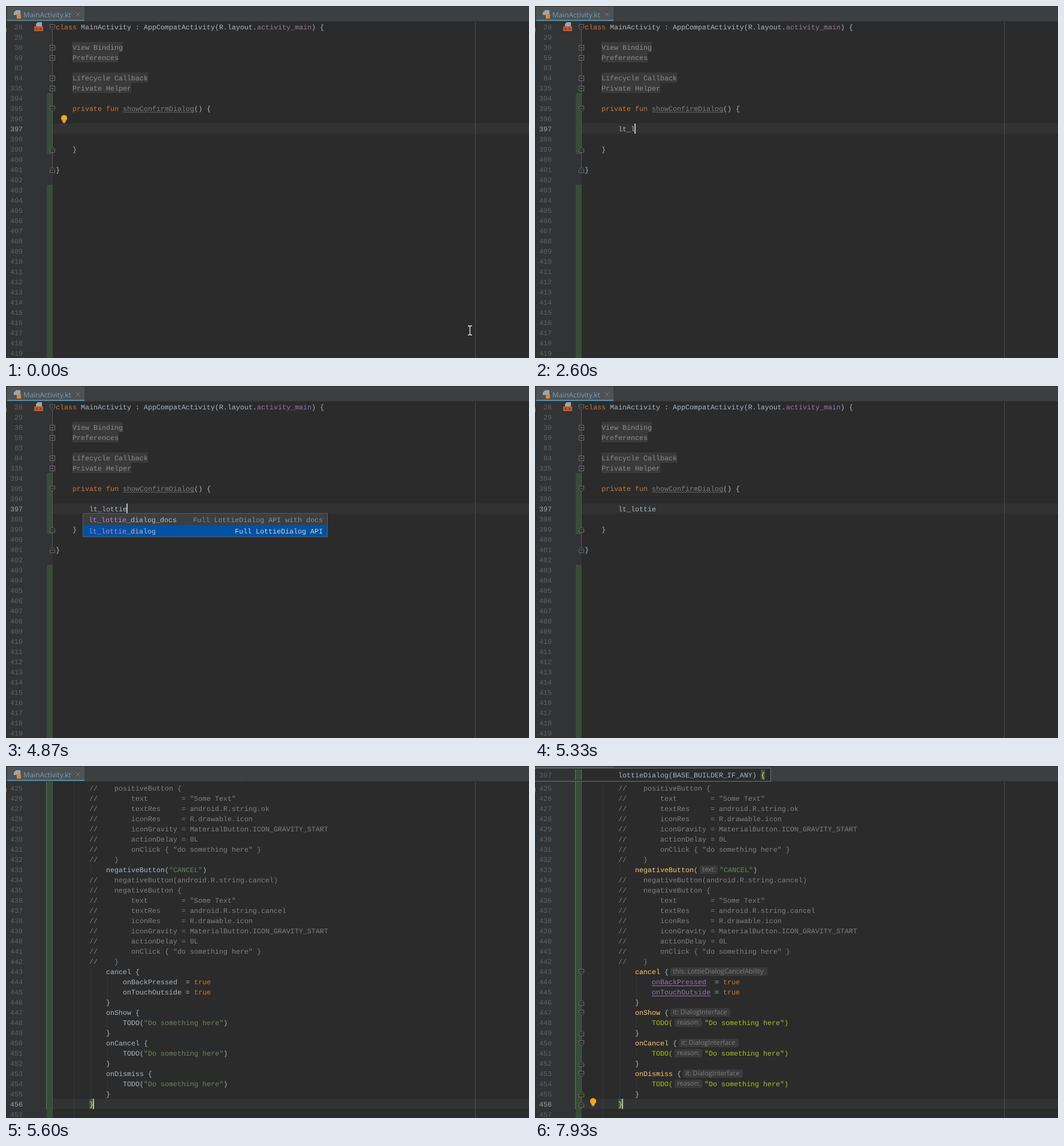
Animation, 873 px wide and 587 px high, one loop 8 s. Source, as an HTML page:

```html
<!DOCTYPE html>
<html lang="en">
<head>
<meta charset="utf-8">
<title>Live template</title>
<style>
html, body { margin: 0; width: 100%; height: 100%; overflow: hidden; background: #2b2b2b; }
svg { display: block; width: 873px; height: 587px; }
text { white-space: pre; text-rendering: geometricPrecision; font: 11.666px "Liberation Mono", "DejaVu Sans Mono", monospace; }
.ui { font: 11px "Open Sans", "Noto Sans", sans-serif; }
.tab { font-size: 11.8px; }
</style>
</head>
<body>
<svg id="stage" viewBox="0 0 873 587"></svg>
<script>
const LOOP = 8000, CW = 7, LH = 17, LEFT = 83;
const C = {
  text: '#a9b7c6', key: '#cc7832', note: '#808080', str: '#6a8759', prop: '#9876aa',
  fn: '#ffc66d', todo: '#a8c023', num: '#606366', cur: '#a4a3a3', add: '#384c38',
  gutter: '#313335', bg: '#2b2b2b', line: '#323232', fold: '#6c6e70', brace: '#ffef28'
};

const esc = s => s.replace(/&/g, '&amp;').replace(/</g, '&lt;');
const rect = (x, y, w, h, fill, extra = '') =>
  `<rect x="${x}" y="${y}" width="${w}" height="${h}" fill="${fill}" ${extra}/>`;
const path = (d, stroke, extra = '') => `<path d="${d}" stroke="${stroke}" fill="none" ${extra}/>`;
const text = (x, y, s, fill, extra = '') => `<text x="${x}" y="${y}" fill="${fill}" ${extra}>${esc(s)}</text>`;
const group = (id, body, extra = '') => `<g id="${id}" ${extra}>${body}</g>`;
const colX = c => LEFT + CW * c;
const rowY = n => 154 + LH * (n - 394);
const italic = 'font-style="italic"';

// Runs are [string, colour, attributes] laid out from one column.
function runs(col, y, list, shift = 0) {
  return list.map(([s, fill = C.text, extra = '']) => {
    const out = text(colX(col) + shift, y + 4, s, fill, extra);
    col += s.length;
    return out;
  }).join('');
}

function codeLine(src, y) {
  const col = src.search(/\S/);
  const body = src.trim();
  if (col < 0) return '';
  if (body.startsWith('//')) return runs(col, y, [[body, C.note]]);
  return runs(col, y, body.split(/("[^"]*"|\btrue\b)/).filter(Boolean).map(s =>
    [s, s[0] === '"' ? C.str : s === 'true' ? C.key : C.text]));
}

const lineNo = (n, y, fill = C.num) => text(28, y + 4, String(n), fill, 'text-anchor="end"');

function foldPlus(y) {
  return rect(73.5, y - 4, 8, 8, C.bg, `stroke="${C.fold}"`) +
    path(`M75.5 ${y}h4M77.5 ${y - 2}v4`, C.fold);
}
function foldMark(y, dir) {
  return `<path d="M73.5 ${y - 4.5 * dir}h8v${5 * dir}l-4 ${4 * dir}l-4 ${-4 * dir}z" fill="${C.bg}" stroke="${C.fold}"/>` +
    path(`M75.5 ${y - dir * .5}h4`, C.fold);
}
const foldOpen = y => foldMark(y, 1);
const foldEnd = y => foldMark(y, -1);

const bulb = y => `<circle cx="97" cy="${y - 1}" r="5.2" fill="#f4a41f"/>` +
  rect(94.5, y + 3, 5, 2, '#f4a41f') + rect(94.5, y + 5, 5, 1, '#c8c8c8') + rect(95.5, y + 7, 3, 1, '#a0a0a0');

function hint(x, y, s, w) {
  return rect(x, y - 7, w, 14, '#3a3a3a', 'rx="3"') + text(x + 4, y + 3, s, '#7d7d7d', 'class="ui"');
}

function background() {
  return rect(0, 0, 873, 587, C.bg) + rect(0, 26, 78, 561, C.gutter) + rect(0, 26, 1, 561, C.bg) +
    rect(0, 36, 1, 8, '#8a6a3c') + rect(0, 107, 1, 18, '#0d3a58');
}

function tabBar() {
  return rect(0, 0, 873, 26, '#3c3f41') + rect(0, 0, 873, 1, '#323232') + rect(0, 25, 873, 1, '#323232') +
    rect(2, 1, 129, 22, '#4e5254') + '<rect id="underline" x="2" y="23" width="129" height="2"/>' +
    `<path d="M17 7h7v8h-11v-4z" fill="#9aa7b0"/>` + rect(18, 14, 7, 7, '#e0843a') +
    text(29, 19, 'MainActivity.kt', '#6fa0c4', 'class="ui tab"') +
    path('M116.500 10.500l7 7m0-7l-7 7', '#75797c');
}

function beforeDoc() {
  const head = [28, 29, 30, 59, 83, 84, 335];
  let s = rect(68, 145, 10, 102, C.add) + rect(68, 298, 10, 289, C.add) +
    rect(78, 196, 795, LH, C.line) + path('M77.500 40V273', '#555759');
  for (let i = 0; i < 33; i++) {
    const n = i < 7 ? head[i] : 387 + i;
    s += lineNo(n, 35 + LH * i, n === 397 ? C.cur : C.num);
  }
  s += runs(0, 35, [['class ', C.key], ['MainActivity : AppCompatActivity(R.layout.'],
    ['activity_main', C.prop, italic], [') {']]);
  [['View Binding', 69], ['Preferences', 86], ['Lifecycle Callback', 120], ['Private Helper', 137]].forEach(([name, y]) => {
    s += rect(111, y - 9, name.length * CW, LH, '#3a3a3a') + runs(4, y, [[name, '#8a8d88']]) + foldPlus(y + .5);
  });
  s += runs(4, 171, [['private fun ', C.key], ['showConfirmDialog', '#7b7d80'], ['() {']]);
  let wave = 'M195 178';
  for (let x = 0; x < 119; x += 4) wave += 'l2-2l2 2';
  s += path(wave, '#747678', 'stroke-width=".8"');
  s += runs(4, 239, [['}']]) + runs(0, 273, [['}']]);
  s += foldOpen(35.5) + foldOpen(171.5) + foldEnd(239.5) + foldEnd(273.5);
  // layout file icon
  s += '<path d="M53 27h7v7h-10v-4z" fill="#9aa7b0"/>' + rect(47, 34, 15, 8, '#c4562c') +
    path('M52.500 36l-2 2l2 2M56.500 36l2 2l-2 2', '#3a2018');
  return s;
}

const note = s => ' '.repeat(8) + '//' + ' '.repeat(4) + s;
const field = (k, v, w) => note('    ' + k.padEnd(w) + '= ' + v);
const call = s => ' '.repeat(12) + s;

function textBlock(name, label) {
  return [call(`${name}("${label}")`), note(`${name}(R.string.text)`), note(`${name} {`),
    field('text', `"${label}"`, 9), field('textRes', 'R.string.text', 9),
    field('fontRes', 'R.font.font', 9), field('styleRes', 'R.style.TextAppearance', 9), note('}')];
}
function buttonBlock(kind, label) {
  const name = kind + 'Button', res = 'android.R.string.' + label.toLowerCase();
  return [call(`${name}("${label}")`), note(`${name}(${res})`), note(`${name} {`),
    field('text', '"Some Text"', 12), field('textRes', res, 12), field('iconRes', 'R.drawable.icon', 12),
    field('iconGravity', 'MaterialButton.ICON_GRAVITY_START', 12), field('actionDelay', '0L', 12),
    note('    onClick { "do something here" }'), note('}')];
}
const events = ['onShow', 'onCancel', 'onDismiss'];
const FIRST = 403;
const template = [
  field('animRes', 'R.raw.animation', 9), field('height', '200', 9), field('loop', 'true', 9), note('}'),
  ...textBlock('title', 'Some Title'), ...textBlock('content', 'Some Content'),
  ...buttonBlock('positive', 'OK'), ...buttonBlock('negative', 'CANCEL'),
  call('cancel {'), call('    onBackPressed  = true'), call('    onTouchOutside = true'), call('}'),
  ...events.flatMap(e => [call(e + ' {'), call('    TODO("Do something here")'), call('}')])
];
const analysed = n => n === 433 || n >= 443;

// Rows as they look after code analysis, with or without inlay hints.
function semantic(hints) {
  const fn = s => [s, C.fn, italic];
  const todo = s => [s, C.todo, italic];
  let y = rowY(433);
  let s = runs(12, y, [fn('negativeButton'), ['(']]) +
    runs(27, y, [['"CANCEL"', C.str], [')']], hints ? 36 : 0);
  if (hints) s += hint(275, y, 'text:', 30);
  y = rowY(443);
  s += runs(12, y, [fn('cancel'), [' {']]);
  if (hints) s += hint(226, y, 'this: LottieDialogCancelAbility', 162);
  ['onBackPressed', 'onTouchOutside'].forEach((name, i) => {
    const ry = rowY(444 + i);
    s += runs(16, ry, [[name, C.prop]]) + runs(31, ry, [['= '], ['true', C.key]]) +
      rect(195, ry + 6, name.length * CW, 1, C.prop);
  });
  s += runs(12, rowY(446), [['}']]);
  events.forEach((name, i) => {
    const n = 447 + 3 * i;
    s += runs(12, rowY(n), [fn(name), [' {']]) + runs(16, rowY(n + 1), [todo('TODO(')]) +
      runs(21, rowY(n + 1), [todo('"Do something here")')], hints ? 53 : 0) + runs(12, rowY(n + 2), [['}']]);
    if (hints) s += hint(colX(14 + name.length) + 3, rowY(n), 'it: DialogInterface', 100) +
      hint(233, rowY(n + 1), 'reason:', 46);
  });
  return s;
}

function afterDoc() {
  const top = rowY(397) - 9, end = rowY(456) + 8;
  const guide = (col, a, b) => rect(colX(col) + 2, rowY(a) - 9, 1, (b - a + 1) * LH, '#373737');
  let s = rect(68, top, 10, 1200, C.add) + rect(67, top, 1, end - top, '#548050') +
    rect(77, top, 1, end - top, '#446344') + rect(78, rowY(456) - 9, 795, LH, C.line) + guide(4, 397, 458);
  [[407, 407], [415, 415], [423, 423], [433, 433], [443, 455]].forEach(([a, b]) => s += guide(8, a, b));
  [[444, 445], [448, 448], [451, 451], [454, 454]].forEach(([a, b]) => s += guide(12, a, b));
  for (let n = FIRST; n < 460; n++) s += lineNo(n, rowY(n), n === 456 ? C.cur : C.num);
  let raw = '';
  template.forEach((src, i) => {
    const n = FIRST + i, line = codeLine(src, rowY(n));
    if (analysed(n)) raw += line; else s += line;
  });
  const last = rowY(456);
  s += rect(139, last - 9, CW, LH, '#3b514d') + runs(8, last, [['}', C.brace, 'font-weight="bold"']]);
  const folds = [443, 447, 450, 453].map(n => foldOpen(rowY(n) + .5)).join('') +
    [446, 449, 452, 455, 456].map(n => foldEnd(rowY(n) + .5)).join('');
  return s + group('raw', raw) + group('sem', semantic(false)) + group('hints', semantic(true)) +
    group('folds', folds) + group('bulbB', bulb(last - 4)) + group('caretB', rect(145, last - 9, 2, LH, '#bbbbbb'));
}

function popup() {
  const item = (y, name, info) => text(138, y, 'lt_lottie', '#c77fd6') + text(201, y, name, '#bbbbbb') + info;
  const info = (y, s, id) => text(529, y, s, '#8c8c8c', `id="${id}" text-anchor="end"`);
  return rect(128.5, 212.5, 408, 39, '#3c3f41', 'stroke="#5a5d5f"') +
    rect(129, 232, 407, 19, '#0052a4', 'id="picked"') +
    item(227, '_dialog_docs', info(227, 'Full LottieDialog API with docs', 'info1')) +
    item(246, '_dialog', info(246, 'Full LottieDialog API', 'info2'));
}

function header() {
  return rect(0, 3, 394, 23, C.bg) + rect(0, 3, 78, 23, C.gutter) + rect(68, 6, 10, 17, C.add) +
    path('M67.500 6V23M77.500 6V23', '#548050') + path('M0 3.500H393.500V25.500H0', '#737373') +
    lineNo(397, 15) + rect(377, 6, CW, LH, '#3b514d') +
    runs(8, 15, [['lottieDialog(BASE_BUILDER_IF_ANY) '], ['{', C.brace, 'font-weight="bold"']]);
}

const stage = document.getElementById('stage');
stage.innerHTML = '<clipPath id="view"><rect y="26" width="873" height="561"/></clipPath>' + background() +
  group('before', beforeDoc() + group('bulbA', bulb(188)) + text(139, 209, '', C.text, 'id="typed"') +
    rect(0, 196, 2, LH, '#bbbbbb', 'id="caretA"')) +
  `<g clip-path="url(#view)">${group('after', afterDoc())}</g>` +
  rect(783, 26, 1, 561, '#4d4d4d') + tabBar() + group('popup', popup()) + group('header', header()) +
  group('mouse', path('M-3.500-7.500H-1L0-6.500L1-7.500H3.500M0-6.500V6.500M-3.500 7.500H-1L0 6.500L1 7.500H3.500', '#e8e8e8', 'stroke-width="1.300"'));

const el = {};
stage.querySelectorAll('[id]').forEach(e => el[e.id] = e);
const show = (id, on) => el[id].style.display = on ? '' : 'none';
const keys = [2070, 2130, 2400, 2600, 2800, 2930, 3070, 3200, 3270];

function mouseAt(t) {
  if (t >= 1070) return [201.5, 207];
  const p = Math.min(Math.floor((t + 4) * 15 / 1000), 12) / 12;
  const e = p * p * (3 - 2 * p);
  return [Math.round(774 - 583 * e) + .5, Math.round(541 - 333 * e)];
}

function render(t) {
  const inRange = (a, b = LOOP) => t >= a && t < b;
  const typed = keys.filter(k => t >= k).length;
  el.typed.textContent = 'lt_lottie'.slice(0, typed);
  el.caretA.setAttribute('x', 138 + CW * typed);
  el.underline.setAttribute('fill', t < 1070 ? '#4a8499' : '#4094b4');
  el.mouse.setAttribute('transform', `translate(${mouseAt(t)})`);
  const scroll = t < 5530 ? 300 : t < 5600 ? 539 : 644;
  el.after.setAttribute('transform', `translate(0 ${-scroll})`);
  el.info1.setAttribute('fill', t < 4870 ? '#bbbbbb' : '#8c8c8c');
  el.info2.setAttribute('fill', t < 4870 ? '#8c8c8c' : '#d0d4d8');
  show('before', t < 5470);
  show('after', t >= 5470);
  show('bulbA', t < 1070);
  show('mouse', t < 2070);
  show('caretA', inRange(1070, 4070) || inRange(4600, 5070));
  show('popup', inRange(4400, 5330));
  show('picked', t >= 4870);
  show('header', t >= 5800);
  show('caretB', inRange(5470, 6330) || t >= 6800);
  show('raw', t < 7070);
  show('sem', inRange(7070, 7400));
  show('hints', t >= 7400);
  show('folds', t >= 7600);
  show('bulbB', t >= 7930);
}

const start = performance.now();
function tick() {
  render((performance.now() - start) % LOOP);
  requestAnimationFrame(tick);
}
tick();
</script>
</body>
</html>
```
